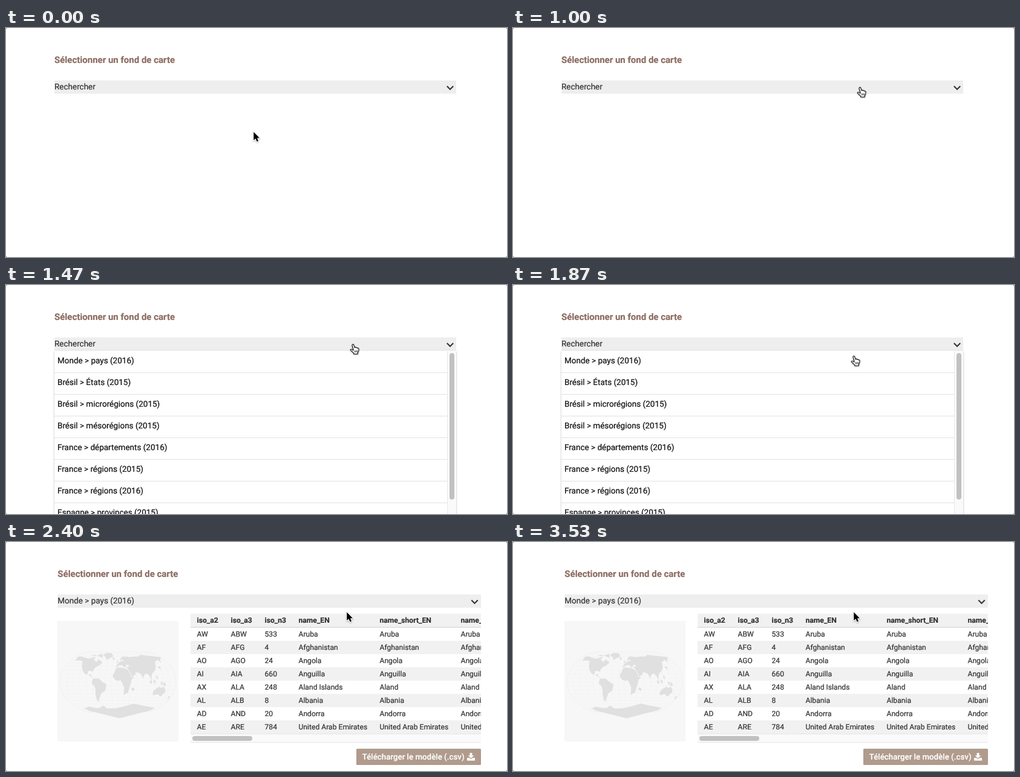
Recreate the animation shown at these times as an HTML page. Size 828x380 px, loop 3.59 s.

```html
<!DOCTYPE html>
<html lang="fr">
<head>
<meta charset="utf-8">
<title>Fond de carte</title>
<style>
html, body { margin: 0; width: 100%; height: 100%; overflow: hidden; background: #fff; }
svg { display: block; width: 828px; height: 380px; }
text { font: 13.5px Roboto, sans-serif; fill: var(--ink); stroke: var(--ink); stroke-width: .22px; text-rendering: geometricPrecision; --ink: #333; }
.title { font-size: 15px; font-weight: 700; --ink: #8d6e63; }
.item { --ink: #111; }
.cell, .head { font-size: 12.15px; }
.head { font-weight: 700; }
.btn { font-size: 13.3px; font-weight: 500; --ink: #fff; }
</style>
</head>
<body>
<svg viewBox="0 0 828 380">
  <defs>
    <filter id="soft" x="-10%" y="-10%" width="120%" height="120%">
      <feDropShadow dx="0" dy="1" stdDeviation="1.5" flood-color="#000" flood-opacity=".3"/>
    </filter>
    <filter id="drop" x="-50%" y="-50%" width="200%" height="200%">
      <feDropShadow dx="0" dy="1" stdDeviation=".8" flood-color="#000" flood-opacity=".35"/>
    </filter>
    <clipPath id="tableBox"><rect x="305" y="119" width="480" height="215"/></clipPath>
  </defs>
  <rect width="828" height="380" fill="#fff"/>
  <g id="form">
    <text class="title" x="80" y="58">Sélectionner un fond de carte</text>
    <rect id="bar" x="80" y="87" width="664" height="22" fill="#eee"/>
    <text id="choice" x="80" y="102"></text>
    <path id="chevron" d="M728.8 96.5 734 101.7 739.2 96.5" fill="none" stroke="#333" stroke-width="2.1"/>
  </g>
  <g id="menu"></g>
  <g id="result">
    <g id="map"></g>
    <g id="table" clip-path="url(#tableBox)"></g>
  </g>
  <g id="button">
    <rect x="538" y="319" width="206" height="27" rx="1.5" fill="#b09b8c"/>
    <text class="btn" x="547.7" y="337">Télécharger le modèle (.csv)</text>
    <path transform="translate(721 326)" fill="#fff" d="M4.6 0h3.8v4.2h3L6.5 9 1.6 4.2h3ZM0 8.3h4.2l2.3 2.1 2.3-2.1H13v4.5H0Z"/>
  </g>
  <g id="upload">
    <text class="title" x="80" y="375">Importer</text>
    <text class="title" x="149.7" y="375">un fichier csv</text>
    <path d="M80 379.5H141" stroke="#a08a7c"/>
    <path d="M150 379.5H240" stroke="#a08a7c" stroke-dasharray="1 1"/>
  </g>
  <g id="cursor" filter="url(#drop)">
    <path id="arrow" stroke="#fff" stroke-width="2" paint-order="stroke" d="M.8 1V14.8L3.9 11.9 6.2 17 8.6 16 6.5 11H10.6Z"/>
    <g id="hand" transform="translate(-5 -.5)" stroke="#111" stroke-width="1.1" stroke-linejoin="round">
      <path fill="#fff" d="M5.5 9.5 3.6 3C3 .8 5.6.2 6.2 2L7.8 6.5C8.4 5.2 10 5.4 10.3 6.8 11 5.8 12.4 6.2 12.6 7.6 13.6 7 14.7 7.6 14.6 9L14 13 12.8 15V17H6.3V15.6L1.2 10.8C0 9.2 2 8.4 3.2 9.6L5.4 11Z"/>
      <path fill="none" stroke-width=".9" d="M7.9 11v3.4M10 11v3.4M12 11v3.4"/>
    </g>
  </g>
  <path fill="#777" d="M0 0H2.5Q0 0 0 2.5ZM828 0H825.5Q828 0 828 2.5ZM0 380H2.5Q0 380 0 377.5ZM828 380H825.5Q828 380 828 377.5Z"/>
</svg>
<script>
const $ = id => document.getElementById(id);
const LOOP = 3590, OPEN = 1260, PICK = 1990, LOADED = 2190;

const rect = (x, y, w, h, fill, more = '') =>
  `<rect x="${x}" y="${y}" width="${w}" height="${h}" fill="${fill}" ${more}/>`;
const line = (d, color) => `<path d="${d}" stroke="${color}" fill="none"/>`;
const label = (x, y, cls, s) =>
  `<text class="${cls}" x="${x}" y="${y}">${s.replace('>', '&gt;')}</text>`;

function buildMenu() {
  const items = ['Monde > pays (2016)', 'Brésil > États (2015)', 'Brésil > microrégions (2015)',
    'Brésil > mésorégions (2015)', 'France > départements (2016)', 'France > régions (2015)',
    'France > régions (2016)', 'Espagne > provinces (2015)'];
  let out = rect(80, 109.5, 664, 290, '#fff', 'filter="url(#soft)"');
  out += rect(729.5, 109.5, 14.5, 290, '#fafafa') + line('M729.5 110V380', '#e8e8e8');
  items.forEach((s, i) => {
    const y = 109 + 36 * i;
    out += label(85, y + 21, 'item', s) + line(`M80 ${y + 36.5}H729`, '#e2e2e2');
  });
  $('menu').innerHTML = out + rect(733, 113, 8, 243, '#c1c1c1', 'rx="4"');
}

function buildTable() {
  const colX = i => 315.5 + 56 * Math.min(i, 3) + 134 * Math.max(i - 3, 0);
  const head = 'iso_a2 iso_a3 iso_n3 name_EN name_short_EN name_long_EN'.split(' ');
  const rows = ['AW,ABW,533,Aruba', 'AF,AFG,4,Afghanistan', 'AO,AGO,24,Angola', 'AI,AIA,660,Anguilla',
    'AX,ALA,248,Aland Islands', 'AL,ALB,8,Albania', 'AD,AND,20,Andorra', 'AE,ARE,784,United Arab Emirates'];
  let out = rect(305, 119, 480, 22, '#f1f1f1') + line('M305 141.5H785', '#d0d0d0');
  head.forEach((s, i) => out += label(colX(i), 134, 'head', s));
  rows.forEach((row, i) => {
    const y = 142 + 22 * i, r = row.split(',');
    if (i % 2) out += rect(305, y, 480, 22, '#f1f1f1');
    const cells = [...r, r[3].replace(' Islands', ''), r[3]];
    cells.forEach((s, c) => out += label(colX(c), y + 15, 'cell', s));
  });
  out += rect(305, 318, 480, 15, '#fafafa') + line('M305 318.5H785M305 332.5H785', '#e6e6e6');
  $('table').innerHTML = out + rect(308, 322, 99, 8, '#c1c1c1', 'rx="4"');
}

let seed = 7;
const rand = () => (seed = seed * 16807 % 2147483647) / 2147483647;

// longitude and latitude to the stage, pseudocylindrical
function project(lon, lat) {
  const u = lat / 90;
  return [185 + 96 * lon / 180 * (1 - .45 * u * u), 232 - 50 * (1.17 * u - .17 * u ** 3)];
}

const curve = (n, at) => 'M' + Array.from({ length: n + 1 }, (_, i) => project(...at(i / n))).join(' ');

// closed shape whose edges are broken once to look like a coast
function coast(points) {
  const p = points.map(q => project(...q));
  return 'M' + p.map(([x, y], i) => {
    const [x2, y2] = p[(i + 1) % p.length], k = (rand() - .5) * .35;
    return [x, y, (x + x2) / 2 + (y - y2) * k, (y + y2) / 2 + (x2 - x) * k];
  }).join(' ') + 'Z';
}

const isle = ([lon, lat]) =>
  coast([[lon - 4, lat + 4], [lon + 3, lat + 3], [lon + 4, lat - 5], [lon - 2, lat - 3]]);

function buildMap() {
  const lands = [
    '-168,66 -156,71 -95,70 -94,60 -80,53 -76,62 -56,52 -75,38 -81,26 -97,28 -96,18 -87,20 -78,8 -106,21 -124,42 -132,56 -162,57',
    '-70,77 -30,83 -20,72 -44,60',
    '-122,73 -80,82 -64,66 -88,73',
    '-77,9 -60,9 -35,-7 -40,-22 -63,-42 -68,-55 -75,-48 -71,-18 -81,-5',
    '-6,36 10,37 33,31 43,12 51,12 40,-4 33,-28 19,-35 9,4 -8,5 -17,15',
    '-9,37 -2,48 10,55 22,56 18,62 8,58 15,69 28,71 70,71 104,77 180,69 163,60 157,52 155,60 136,54 128,39 121,30 108,20 105,9 103,2 97,17 90,22 78,8 72,21 57,25 55,18 44,13 35,30 28,37 40,42 30,46 23,37 13,45 3,43',
    '114,-23 130,-12 137,-16 142,-11 153,-27 147,-38 131,-32 116,-35',
    '-165,-78 -100,-74 -62,-66 -50,-76 20,-70 110,-67 165,-74 165,-83 -150,-84'
  ].map(s => s.split(' ').map(q => q.split(',').map(Number)));
  const isles = [[-2, 54], [-18, 65], [47, -19], [139, 37], [102, 0], [113, 1], [122, 12], [136, -4], [144, -6], [174, -42]];
  let grid = '';
  for (let lon = -160; lon <= 160; lon += 20) grid += curve(12, k => [lon, 180 * k - 90]);
  for (let lat = -80; lat <= 80; lat += 10) grid += curve(1, k => [360 * k - 180, lat]);
  const edge = curve(24, k => [-180, 180 * k - 90]) + curve(24, k => [180, 180 * k - 90]) +
    'M132 182H238M132 282H238';
  $('map').innerHTML = rect(85, 131, 200, 200, '#f7f7f7') + line(grid, '#f4f4f4') + line(edge, '#f1f1f1') +
    `<path d="${lands.map(coast).join('')}${isles.map(isle).join('')}" fill="#e0e0e0"/>`;
}

// pointer: speeds up and overshoots the bar, settles on it, then drops to the first item
function pointer(t) {
  const k = (from, to) => Math.min(1, Math.max(0, (t - from) / (to - from)));
  const rush = k(70, 800) ** 1.6, settle = k(800, 1000), fall = k(1500, 1800);
  const drop = fall * fall * (3 - 2 * fall), nudge = t >= LOADED;
  return [408.5 + 185.5 * rush - 20.5 * settle - 10 * drop - nudge,
    171.5 - 102.5 * rush + 29 * settle + 19.5 * drop - 2 * nudge];
}

const show = (id, on) => $(id).setAttribute('display', on ? 'inline' : 'none');
const move = (id, x, y) => $(id).setAttribute('transform', `translate(${x} ${y})`);

function draw(now) {
  const t = Math.floor((now % LOOP + 4) * 15 / 1000) * 1000 / 15;
  const picked = t >= PICK, loaded = t >= LOADED, open = t >= OPEN && !picked;
  move('form', loaded ? 5.3 : 0, 0);
  move('chevron', loaded ? 35.2 : 0, 0);
  move('button', loaded ? 41 : 0, loaded ? 24 : 0);
  $('bar').setAttribute('width', loaded ? 699.7 : 664);
  $('choice').textContent = picked ? 'Monde > pays (2016)' : 'Rechercher';
  show('menu', open);
  show('button', picked);
  show('upload', picked && !loaded);
  show('result', loaded);
  const [x, y] = pointer(t);
  const hand = !loaded && (picked || open || (y > 87 && y < 109));
  show('hand', hand);
  show('arrow', !hand);
  move('cursor', x, y);
}

buildMenu();
buildTable();
buildMap();
const start = performance.now();
function tick() {
  draw(performance.now() - start);
  requestAnimationFrame(tick);
}
tick();
</script>
</body>
</html>
```
